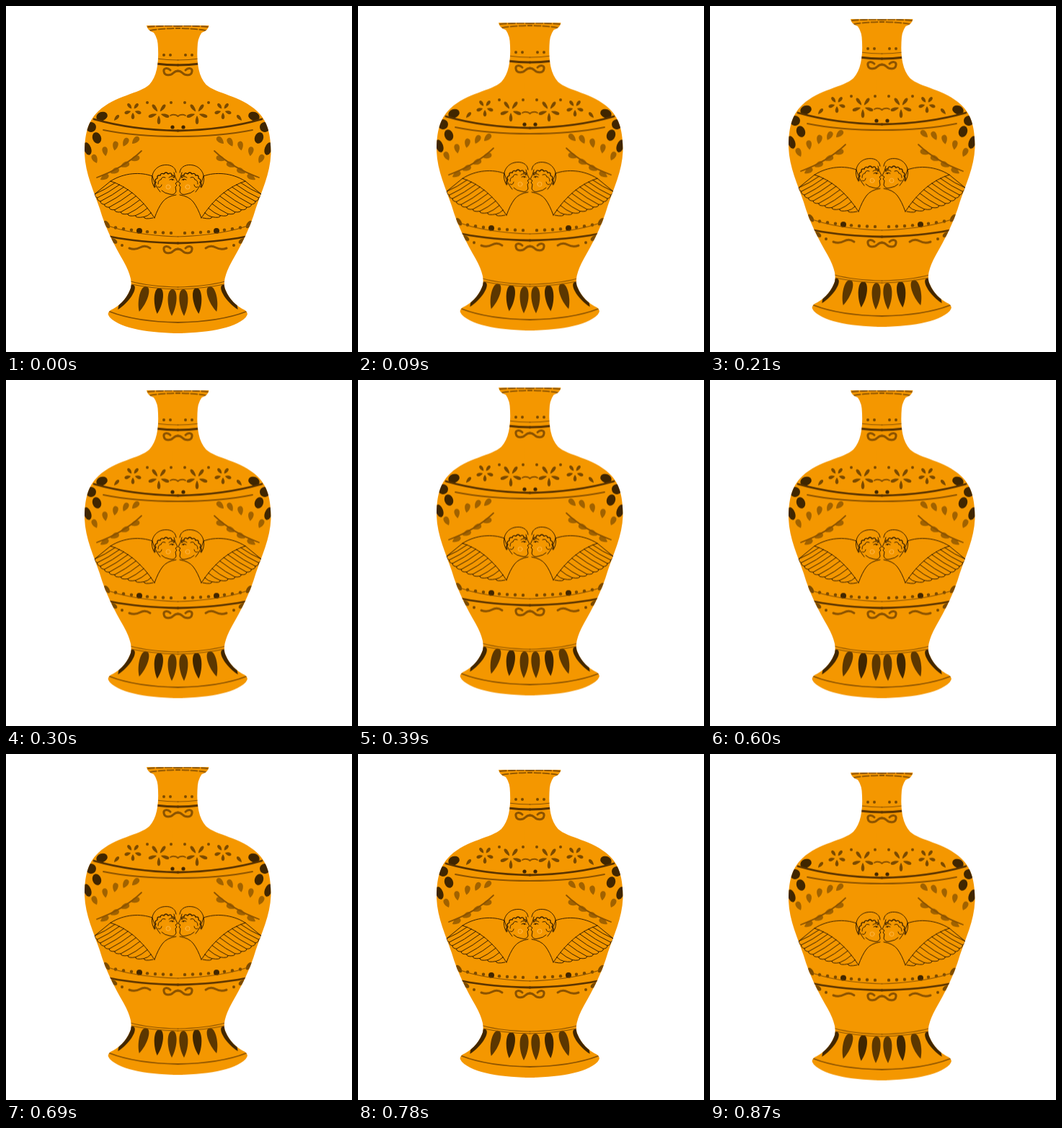
Write an HTML page that moves like this. It is 480x480 px and loops after 0.9 s.

```html
<!DOCTYPE html>
<html lang="en">
<head>
<meta charset="utf-8">
<title>Floating vase</title>
<style>
  html, body { margin: 0; width: 100%; height: 100%; overflow: hidden; background: #fff; }
  svg { display: block; width: 100vw; height: 100vh; }
  .line { fill: none; stroke-linecap: round; stroke-linejoin: round; }
  .brush { stroke: #8a5200; stroke-width: 1.8; }
  .bold { stroke: #573200; stroke-width: 2.8; }
  .thin { stroke-width: 1.1; }
  .ink { stroke: #2c1900; stroke-width: .95; }
</style>
</head>
<body>
<svg viewBox="0 0 480 480">
  <defs>
    <!-- left half, reaching a little past the axis so both halves overlap -->
    <path id="side" d="M245 27H195Q196 34 205 37Q211 45 211 59C212 80 209 98 199 109
      C185 122 151 124 128 146C113 160 109 179 109 205C110 233 122 257 130 281
      C138 309 151 333 163 354Q178 381 172 394Q164 413 145 422Q139 426 144 432C160 448 200 454 245 454Z"/>
    <g id="body">
      <use href="#side"/>
      <use href="#side" transform="matrix(-1 0 0 1 476.5 0)"/>
    </g>
    <clipPath id="inside">
      <use href="#side"/>
      <use href="#side" transform="matrix(-1 0 0 1 476.5 0)"/>
    </clipPath>
    <g id="half">
      <g id="paint"></g>
      <g class="line brush">
        <path d="M197 29Q217 27 239 28M200 34Q217 31 239 31" stroke-dasharray="9 3"/>
        <path class="thin" d="M209 73Q223 75 239 75"/>
        <path class="bold" d="M208 80Q223 82 239 82"/>
        <path class="bold" d="M122 157Q175 172 239 173"/>
        <path d="M135 172Q180 181 239 181"/>
        <path d="M126 238Q164 224 188 201"/>
        <path class="thin" d="M134 302C160 313 200 319 239 320"/>
        <path class="bold" d="M145 320Q185 328 239 329"/>
        <path stroke-width="3" d="M171 336Q179 339 186 335T200 336"/>
        <path id="curl" stroke-width="3" d="M228 89C224 85 218 86 219 91C220 97 228 97 232 93Q235 90 239 90"/>
        <use href="#curl" y="247"/>
        <path d="M228 152Q233 149 239 153"/>
        <path class="thin" d="M173 382Q199 389 239 390M174 386Q202 392 239 393"/>
        <path d="M144 424Q180 438 239 439"/>
      </g>
      <g class="line ink">
        <path id="wing"/>
        <path d="M203 236C187 230 164 231 145 243L123 261M203 236Q207 250 214 258M236 262Q223 264 217 272T206 294"/>
        <path d="M206 252C198 239 204 224 217 221C226 219 235 222 236 231"/>
        <path d="M233 231L235 238L238 244L235 246L237 249L235 251L236 257Q234 263 227 261Q220 260 216 256"/>
        <path stroke-width="1.3" d="M207 251q-3-4 1-6q-3-4 2-6q-1-5 4-4q1-4 5-2q3-4 6 0q5-3 5 2q4-1 3 3"/>
        <path d="M211 247q0-6 4-6q1-5 6-3M211 251q4 2 5-3M226 238Q230 235 233 238M227 241Q230 239 233 241"/>
        <circle cx="230.6" cy="241" r=".6"/>
        <circle cx="225" cy="251" r="3" stroke="#ffb84a"/>
      </g>
    </g>
  </defs>
  <g id="vase">
    <use href="#body" fill="#f49700"/>
    <g clip-path="url(#inside)">
      <use href="#half"/>
      <use href="#half" transform="matrix(-1 0 0 1 477 0)"/>
    </g>
  </g>
</svg>
<script>
const $ = id => document.getElementById(id);
const DARK = '#402600', MID = '#7a4a00', LIGHT = '#a06200';

function add(tag, attrs) {
  const el = document.createElementNS('http://www.w3.org/2000/svg', tag);
  for (const key in attrs) el.setAttribute(key, attrs[key]);
  $('paint').append(el);
}

const blob = (fill, cx, cy, rx, ry = rx, turn = 0) =>
  add('ellipse', { fill, cx, cy, rx, ry, transform: `rotate(${turn} ${cx} ${cy})` });

// Teardrop with its tip at (x, y), growing upwards before it is turned.
const leaf = (fill, x, y, len, w, turn) => add('path', {
  fill, transform: `translate(${x} ${y}) rotate(${turn})`,
  d: `M0 0C${-w} ${-len * .4} ${-w} ${-len} 0 ${-len}S${w} ${-len * .4} 0 0`
});

function flower(x, y, size, petals) {
  for (let i = 0; i < petals; i++) {
    const turn = i * 360 / petals - 36, a = turn * Math.PI / 180;
    leaf(MID, x + 3 * Math.sin(a), y - 3 * Math.cos(a), size, 3, turn);
  }
}

// Neck and shoulder
for (const x of [219, 228]) blob(MID, x, 68, 2);
for (const x of [196, 229]) blob(MID, x, 134, 2);
blob(DARK, 231, 168, 2.6);
flower(176, 145, 9, 5);
flower(212, 149, 12, 5);
leaf(MID, 150, 159, 10, 3, 40);
[133, 118, 126, 113].forEach((x, i) => blob(DARK, x, 153 + 15 * i, 8 - i, 6 + i, -20));

// Branch: leaves fan out above the stem and line up below it
for (let i = 0; i < 5; i++) {
  const k = i / 4;
  leaf(LIGHT, 126 + 49 * k, 218 - 27 * k * (1.6 - .6 * k), 13, 5, -25 + 70 * k);
  if (i < 4) leaf(LIGHT, 131 + 14 * i, 241 - 9 * i, 13, 5, 58 + 4 * i);
}

// Beads along the lower band
for (let i = 0; i < 8; i++) {
  const x = 152 + 11 * i, y = 315 - 10 * ((239 - x) / 100) ** 2;
  i === 3 ? blob(DARK, x, y, 4) : blob(MID, x, y, 2.2);
}
blob(MID, 140, 303, 3, 6, -35);
blob(MID, 150, 326, 5, 3, 38);
blob(MID, 161, 332, 2);

// Petals on the foot lean further out towards the side
for (let i = 0; i < 4; i++) {
  const x = 231 - 18 * i, lean = 1 + 2.3 * i * i, h = 37 - i;
  leaf(i % 2 ? DARK : '#5c3700', x - lean, 430 - 3 * i, Math.hypot(lean, h), 8, Math.atan2(lean, h) * 180 / Math.PI);
}

// Feathers run from the wing's fold to its scalloped edge.
const bend = (a, b, c, k) => a * (1 - k) ** 2 + 2 * b * k * (1 - k) + c * k * k;
const fold = k => [bend(145, 180, 206, k), bend(243, 254, 294, k)];
const edge = k => [bend(123, 138, 204, k), bend(261, 288, 294, k)];
let wing = `M${fold(0)}Q180 254 ${fold(1)}`;
for (let i = 0; i < 10; i++) {
  const [x, y] = edge(i / 10), [fx, fy] = fold((i + 1) / 11);
  wing += `M${fx} ${fy}Q${(x + fx) / 2} ${(y + fy) / 2 + 2} ${x} ${y}Q${x} ${y + 4} ${edge((i + 1) / 10)}`;
}
$('wing').setAttribute('d', wing);

const at = y => ({ transform: `translateY(${y}px)`, easing: 'steps(15)' });
$('vase').animate([at(0), at(-19), at(0)], { duration: 900, iterations: Infinity });
</script>
</body>
</html>
```
